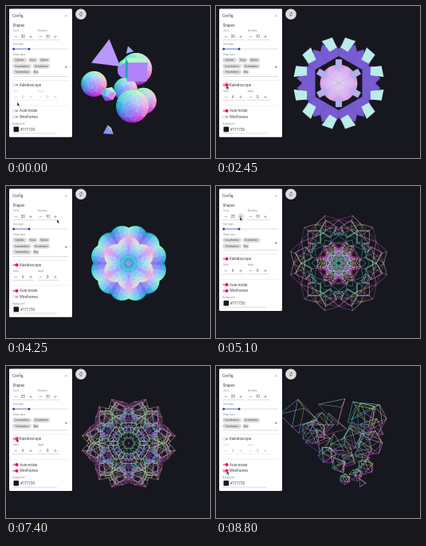
Animation, 256 px wide and 191 px high, one loop 8850 ms. Source, as an HTML page with a canvas:

```html
<!DOCTYPE html>
<html lang="en">
<head>
<meta charset="utf-8">
<title>Kaleidoscope config</title>
<style>
html, body { margin: 0; width: 100%; height: 100%; overflow: hidden; background: #171720; }
canvas, svg { position: absolute; left: 0; top: 0; width: 256px; height: 191px; }
text { font-family: Roboto, Arial, sans-serif; fill: #444; }
.label { fill: #888; }
.rule { stroke: #999; stroke-width: .35; }
.divider { stroke: #ddd; stroke-width: .5; }
.off { opacity: .42; }
</style>
</head>
<body>
<canvas id="view" width="512" height="382"></canvas>
<svg id="ui" viewBox="0 0 256 191"></svg>
<script>
const LOOP = 8850, ROTATE_ON = 450, KALEIDO_ON = 1500, WIRE_ON = 4550, KALEIDO_OFF = 7550;
const RAD = Math.PI / 180, SCALE = 2;
const $ = id => document.getElementById(id);
const noise = n => { const s = Math.sin(n * 127.1 + 3.7) * 43758.5; return s - Math.floor(s); };

// Interpolation through [time, ...values] rows
function track(t, ...rows) {
  const i = rows.findIndex(r => t < r[0]);
  if (i < 1) return rows[i ? rows.length - 1 : 0].slice(1);
  const p = rows[i - 1], q = rows[i], k = (t - p[0]) / (q[0] - p[0]);
  return p.slice(1).map((v, j) => v + (q[j + 1] - v) * k);
}

/* ---------- panel ---------- */
const text = (x, y, size, s, attrs = '') => `<text x="${x}" y="${y}" font-size="${size}" ${attrs}>${s}</text>`;
const label = (x, y, s) => text(x, y, 2.8, s, 'class="label"');
const line = (x1, x2, y, cls) => `<path class="${cls}" d="M${x1} ${y}H${x2}"/>`;

const stepper = (x, y, name, value, id) => label(x + 1, y, name) +
  `<path d="M${x + 2.6} ${y + 6.3}h3.6M${x + 21.2} ${y + 6.3}h3.6M${x + 23} ${y + 4.5}v3.6" stroke="#666" stroke-width=".45"/>` +
  text(x + 13.2, y + 8, 4.5, value, `text-anchor="middle" id="${id}"`) +
  line(x, x + 28, y + 10.3, 'rule');

const toggle = (id, y, name) =>
  `<rect id="${id}Track" x="8.3" y="${y - 1.2}" width="7" height="2.4" rx="1.2"/>` +
  `<circle id="${id}Knob" cy="${y}" r="2"/>` + text(17, y + 1.7, 4.5, name);

// Chips flow left to right, one array per row
function chips(id, ...rows) {
  const rowHtml = rows.map((names, r) => {
    let x = 8;
    const y = 65 + r * 7.5;
    return names.map(s => {
      const w = s.length * 1.95 + 2.5, left = x;
      x += w + 1.3;
      return `<rect x="${left}" y="${y}" width="${w}" height="6.2" rx="3.1" fill="#dedede"/>` +
        text(left + w / 2, y + 4.2, 3.15, s, 'text-anchor="middle"');
    }).join('');
  }).join('');
  const y = 60.5 + rows.length * 5;
  return `<g id="${id}">${rowHtml}<path d="M73.8 ${y + .6}h3.2l-1.6 1.7z" fill="#666"/></g>`;
}
const SOLID_NAMES = [['Icosahedron', 'Octahedron'], ['Tetrahedron', 'Box']];

$('ui').innerHTML = `
  <rect id="card" x="4" y="3.5" width="79" rx="1.2" fill="#fff"/>
  ${text(8, 14, 4.6, 'Config.')}
  <path d="M73.9 13.2l1.5-1.5 1.5 1.5" fill="none" stroke="#666" stroke-width=".6"/>
  ${text(8.5, 26.4, 4.5, 'Shapes')}
  <circle id="plusHover" cx="31" cy="38.3" r="4" fill="#000" opacity=".1"/>
  ${stepper(8, 32.3, 'Count', 20, 'count')}${stepper(39, 32.3, 'Boundary', 10, 'bound')}
  ${label(9, 48.8, 'Size range')}
  <path d="M9 54H78" stroke="#c5cae9" stroke-width=".6"/>
  <path d="M10 54H29" stroke="#3f51b5" stroke-width=".7"/>
  <circle cx="9.6" cy="54" r="1.5" fill="#303f9f"/><circle cx="29" cy="54" r="1.5" fill="#303f9f"/>
  ${label(9, 62, 'Shape types')}
  ${chips('allChips', ['Cylinder', 'Torus', 'Sphere'], ...SOLID_NAMES)}${chips('fewChips', ...SOLID_NAMES)}
  <g id="lower">
    ${line(8, 78, 88.5, 'rule')}${line(8, 78, 93.5, 'divider')}
    <circle id="ripple" cx="13" r="4.6"/>
    ${toggle('kaleido', 99.3, 'Kaleidoscope')}
    <g id="angles">${stepper(8, 108, 'Sides', 6, 'sides')}${stepper(39, 108, 'Angle', 0, 'angle')}</g>
    ${line(8, 78, 125, 'divider')}
    ${toggle('rotate', 131.7, 'Auto-rotate')}${toggle('wire', 139.4, 'Wireframes')}
    ${label(8.5, 148.7, 'Background')}
    <rect x="9.5" y="151.8" width="6.6" height="6.4" rx=".8" fill="#171720"/>
    ${text(18, 156.7, 4.5, '#171720')}${line(8, 64, 160, 'rule')}
  </g>
  <circle cx="94" cy="10.3" r="6.8" fill="#dedede"/>
  <path d="M92.4 11.2a1.8 1.8 0 0 1 2.2-2.6M95.6 9.4a1.8 1.8 0 0 1-2.2 2.6" fill="none" stroke="#555" stroke-width=".55"/>
  <path d="M94.2 7.3v2.4l1.4-1.2zM93.8 13.3v-2.4l-1.4 1.2z" fill="#555"/>
  <path id="cursor" d="M0 0v4.6l1.1-1 .8 1.8.9-.4-.8-1.7h1.5z" fill="#222" stroke="#fff" stroke-width=".35"/>`;

const cursorAt = t => track(t, [0, 14, 121], [400, 13, 131], [1050, 13, 131], [1400, 13, 100], [2800, 13, 100],
  [4250, 64, 42], [4600, 30, 39], [6350, 30, 39], [7150, 13, 91], [7750, 13, 91], [8300, 13.5, 132]);

function setToggle(id, on) {
  $(id + 'Track').setAttribute('fill', on ? '#f591b5' : '#aaa');
  const knob = $(id + 'Knob');
  knob.setAttribute('cx', on ? 13.5 : 10);
  knob.setAttribute('fill', on ? '#f50057' : '#f4f4f4');
  knob.setAttribute('stroke', on ? 'none' : '#bbb');
  knob.setAttribute('stroke-width', .3);
}

function drawPanel(t, kaleido, wire) {
  const shift = wire ? -7.7 : 0, [x, y] = cursorAt(t);
  const show = (id, on) => $(id).style.display = on ? '' : 'none';
  $('card').setAttribute('height', 161.2 + shift);
  $('lower').setAttribute('transform', `translate(0 ${shift})`);
  show('allChips', !wire);
  show('fewChips', wire);
  $('count').textContent = wire ? Math.min(25, 20 + Math.floor((t - WIRE_ON) / 70)) : 20;
  $('angles').setAttribute('class', kaleido ? '' : 'off');
  setToggle('kaleido', kaleido);
  setToggle('rotate', t >= ROTATE_ON);
  setToggle('wire', wire);
  $('cursor').setAttribute('transform', `translate(${x} ${y})`);
  show('plusHover', Math.hypot(x - 31, y - 39) < 4);
  const hit = [99.3, 131.7, 139.4].find(v => Math.hypot(x - 13, y - v - shift) < 3);
  show('ripple', hit);
  $('ripple').setAttribute('cy', hit || 0);
  $('ripple').setAttribute('fill', kaleido ? 'rgba(245,0,87,.15)' : 'rgba(0,0,0,.08)');
}

/* ---------- solids ---------- */
const sub = (a, b) => a.map((v, i) => v - b[i]);
const dot = (a, b) => a[0] * b[0] + a[1] * b[1] + a[2] * b[2];
const cross = (a, b) => [a[1] * b[2] - a[2] * b[1], a[2] * b[0] - a[0] * b[2], a[0] * b[1] - a[1] * b[0]];
const unit = a => { const l = Math.hypot(...a); return a.map(v => v / l); };

// Faces of a small convex solid centred on the origin
function hull(points) {
  const v = points.map(unit), faces = [], seen = new Set();
  for (let i = 0; i < v.length; i++) for (let j = i + 1; j < v.length; j++) for (let k = j + 1; k < v.length; k++) {
    let n = unit(cross(sub(v[j], v[i]), sub(v[k], v[i])));
    if (dot(n, v[i]) < 0) n = n.map(c => -c);
    const d = dot(n, v[i]);
    if (v.some(p => dot(n, p) > d + 1e-6)) continue;
    const ids = v.map((_, m) => m).filter(m => Math.abs(dot(n, v[m]) - d) < 1e-6);
    if (seen.has(ids.join())) continue;
    seen.add(ids.join());
    const mid = n.map(c => c * d), u = unit(sub(v[ids[0]], mid)), w = cross(n, u);
    const turn = m => { const p = sub(v[m], mid); return Math.atan2(dot(p, w), dot(p, u)); };
    faces.push({ ids: ids.sort((a, b) => turn(a) - turn(b)), n });
  }
  return { v, faces };
}

function globe(rows, cols) {
  const v = [], faces = [];
  for (let i = 0; i <= rows; i++) for (let j = 0; j < cols; j++) {
    const a = Math.PI * i / rows, b = 2 * Math.PI * j / cols;
    v.push([Math.sin(a) * Math.cos(b), Math.cos(a), Math.sin(a) * Math.sin(b)]);
  }
  for (let i = 0; i < rows; i++) for (let j = 0; j < cols; j++) {
    const k = (j + 1) % cols, ids = [i * cols + j, i * cols + k, (i + 1) * cols + k, (i + 1) * cols + j];
    const n = unit(ids.reduce((s, m) => s.map((c, q) => c + v[m][q]), [0, 0, 0]));
    // facet jitter gives the mottled surface
    faces.push({ ids, n: unit(n.map((c, q) => c + .32 * (noise(i * 97 + j * 3 + q) - .5))) });
  }
  return { v, faces };
}

const signs = [-1, 1], PHI = (1 + Math.sqrt(5)) / 2;
const ring = (count, r, z) => [...Array(count)].map((_, i) => {
  const a = (i / count - .25) * 2 * Math.PI;
  return [r * Math.cos(a), r * Math.sin(a), z];
});
const GEO = {
  box: hull(signs.flatMap(x => signs.flatMap(y => signs.map(z => [x, y, z])))),
  tetra: hull([[0, 0, -3], ...ring(3, Math.sqrt(8), 1)]),
  octa: hull([[0, 0, -1], [0, 0, 1], ...ring(4, 1, 0)]),
  icosa: hull(signs.flatMap(a => signs.flatMap(b => [[0, a, b * PHI], [a, b * PHI, 0], [b * PHI, 0, a]]))),
  cyl: hull([...ring(12, 1, -1), ...ring(12, 1, 1)]),
  ball: globe(18, 34)
};

function spin([x, y, z], a, b, c) {
  [y, z] = [y * Math.cos(a) - z * Math.sin(a), y * Math.sin(a) + z * Math.cos(a)];
  [x, z] = [x * Math.cos(b) + z * Math.sin(b), z * Math.cos(b) - x * Math.sin(b)];
  return [x * Math.cos(c) - y * Math.sin(c), x * Math.sin(c) + y * Math.cos(c), z];
}

// Normal vector to colour; hue turns the vector around the view axis
function shade(n, hue) {
  const [x, y, z] = spin(n, 0, 0, hue);
  return `rgb(${[x, -y, z].map(v => Math.round(255 * Math.pow(Math.min(1, Math.max(0, v * .5 + .5)), .6)))})`;
}

function addSolid(list, type, [x, y, z], size, turns, yaw = 0, hue = 0) {
  const g = GEO[type];
  const pts = g.v.map(v => {
    const p = spin(v, ...turns), q = spin([p[0] * size + x, p[1] * size + y, p[2] * size + z], 0, yaw, 0);
    const f = 320 / (320 - q[2]);
    return [q[0] * f, q[1] * f, q[2]];
  });
  for (const { ids, n } of g.faces) {
    const p = ids.map(i => pts[i]);
    list.push({ p, n: spin(spin(n, ...turns), 0, yaw, 0), hue, depth: p.reduce((s, q) => s + q[2], 0) / p.length });
  }
}

function paint(ctx, list, wire) {
  list.sort((a, b) => a.depth - b.depth);
  ctx.lineJoin = 'round';
  ctx.lineWidth = wire ? .5 : .3;
  ctx.globalAlpha = wire ? .6 : 1;
  for (const { p, n, hue } of list) {
    if (!wire && n[2] < -.25) continue;
    ctx.beginPath();
    p.forEach(q => ctx.lineTo(q[0], q[1]));
    ctx.closePath();
    if (wire && p.length === 4) { ctx.moveTo(p[0][0], p[0][1]); ctx.lineTo(p[2][0], p[2][1]); }
    ctx.fillStyle = ctx.strokeStyle = shade(n, hue);
    if (!wire) ctx.fill();
    ctx.stroke();
  }
  ctx.globalAlpha = 1;
}

/* ---------- free view ---------- */
const WIRE_TYPES = ['tetra', 'box', 'octa', 'icosa'];
const turnsOf = (i, amount) => [0, 1, 2].map(q => (noise(i * 3 + q) - .5) * amount);

// type, x, y, size, from far to near
const SOLIDS = [
  ['ball', 14, -19, 21], ['tetra', 5, -43, 6], ['cyl', 0, -19, 14], ['ball', 0, 8, 15],
  ['ball', -40, 1, 16], ['tetra', -21, 59, 8], ['ball', 22, 22, 16], ['box', 13, -17, 20],
  ['tetra', -23, -33, 21], ['icosa', -20, 13, 9], ['ball', 8, 27, 19]
];

function addSolids(list, t) {
  const yaw = Math.max(0, t - ROTATE_ON) * .0009;
  SOLIDS.forEach(([type, x, y, size], i) => addSolid(list, type, [x, y, i * 4 - 20], size, turnsOf(i, .7), yaw));
}

// A cluster that is broad and large at the top, narrow and small at the bottom
function addCluster(list, t) {
  const yaw = (t - 8800) * .0008;
  for (let i = 0; i < 25; i++) {
    const u = i / 24, spread = 42 * (1 - u) + 10;
    const pos = [Math.sin(i * 2.4) * spread + 24 * u, -36 + 88 * u, Math.cos(i * 2.4) * 24];
    addSolid(list, WIRE_TYPES[i % 4], pos, 6 + 22 * (1 - u) * (.6 + .4 * noise(i)), turnsOf(i, 3), yaw);
  }
}

function drawFree(ctx, t, wire) {
  const list = [];
  (wire ? addCluster : addSolids)(list, t);
  ctx.save();
  ctx.translate(150, wire ? 93 : 97);
  paint(ctx, list, wire);
  ctx.restore();
}

/* ---------- kaleidoscope ---------- */
const sheet = document.createElement('canvas');
sheet.width = sheet.height = 400;
const sheetCtx = sheet.getContext('2d');
const polar = (r, deg) => [r * Math.cos(deg * RAD), r * Math.sin(deg * RAD), 0];

function plate(ctx, color, scale, pts) {
  ctx.fillStyle = color;
  ctx.beginPath();
  pts.forEach(([r, a]) => ctx.lineTo(...polar(r * scale, a).slice(0, 2)));
  ctx.fill();
}

function ball(ctx, r, deg, size, hue, turn) {
  if (size < .5) return;
  const list = [];
  addSolid(list, 'ball', polar(r, deg), size, [turn, turn * .7, 0], 0, hue);
  paint(ctx, list, false);
}

function solidWedge(ctx, t) {
  const turn = t * .0007;
  const [grow, disc] = track(t, [1500, .84, 16], [2450, 1, 23], [3300, .4, 18], [4550, .3, 10]);
  const [r1, s1, r2, s2] = track(t, [2450, 8, 8, 0, 0], [3000, 28, 14, 14, 12], [4250, 32, 15.5, 18, 14.5], [4550, 49, 18, 23, 16]);
  ball(ctx, r1, 15, s1, Math.PI + .35, turn);
  plate(ctx, '#775bd0', grow, [[34, 30], [29.5, 0], [46, 0], [53, 7], [45, 15], [51, 24], [43, 30]]);
  plate(ctx, '#b9ecea', grow, [[57, 8], [58, 22], [45, 27], [41, 14]]);
  ball(ctx, 0, 0, disc, .2, turn);
  const glow = ctx.createRadialGradient(0, 0, 0, 0, 0, disc);
  glow.addColorStop(0, 'rgba(255,228,232,.75)');
  glow.addColorStop(1, 'rgba(200,190,255,.6)');
  ctx.globalAlpha = track(t, [2450, 1], [3000, 0])[0];
  ctx.fillStyle = glow;
  ctx.beginPath();
  ctx.arc(0, 0, disc, 0, 7);
  ctx.fill();
  ctx.globalAlpha = 1;
  plate(ctx, '#b3b0ee', grow, [[18.5, 17], [30.3, 22.5], [30, 31], [18, 31]]);
  ball(ctx, r2, 30, s2, -.5, turn);
}

function wireWedge(ctx, t) {
  const list = [], turn = (t - WIRE_ON) * .0008;
  const [far, farSize, core] = track(t, [4550, 54, 15, .9], [5100, 45, 18, .6], [6200, 66, 12, 1], [6650, 66, 13, 1.1], [7400, 42, 18, 1.3]);
  for (let i = 0; i < 2; i++) addSolid(list, 'box', polar(far, 13), farSize * (1 - i * .25), [.5 + turn, .4 + i, turn]);
  addSolid(list, 'octa', polar(40, 28), 6, [turn, turn, 0]);
  for (let i = 0; i < 7; i++) {
    const r = (6 + i * 4.5) * core, size = (9 + 10 * noise(i + 4)) * (.5 + core / 2);
    addSolid(list, WIRE_TYPES[i % 4], polar(r, i * 13 % 31), size, [i + turn * .5, i * .8 + turn, i * .5]);
  }
  paint(ctx, list, true);
}

function drawKaleido(ctx, t, wire) {
  sheetCtx.setTransform(1, 0, 0, 1, 0, 0);
  sheetCtx.clearRect(0, 0, 400, 400);
  sheetCtx.setTransform(SCALE, 0, 0, SCALE, 200, 200);
  (wire ? wireWedge : solidWedge)(sheetCtx, t);
  for (let k = 0; k < 12; k++) {
    ctx.save();
    ctx.translate(154, 97);
    ctx.rotate((k >> 1) * 60 * RAD);
    if (k & 1) ctx.scale(1, -1);
    ctx.beginPath();
    ctx.moveTo(0, 0);
    ctx.arc(0, 0, 140, -.3 * RAD, 30.3 * RAD);
    ctx.clip();
    ctx.drawImage(sheet, -100, -100, 200, 200);
    ctx.restore();
  }
}

/* ---------- loop ---------- */
const view = $('view').getContext('2d'), start = performance.now();

function frame() {
  const t = (performance.now() - start) % LOOP;
  const kaleido = t >= KALEIDO_ON && t < KALEIDO_OFF, wire = t >= WIRE_ON;
  view.setTransform(SCALE, 0, 0, SCALE, 0, 0);
  view.fillStyle = '#171720';
  view.fillRect(0, 0, 256, 191);
  (kaleido ? drawKaleido : drawFree)(view, t, wire);
  drawPanel(t, kaleido, wire);
  requestAnimationFrame(frame);
}
frame();
</script>
</body>
</html>
```
